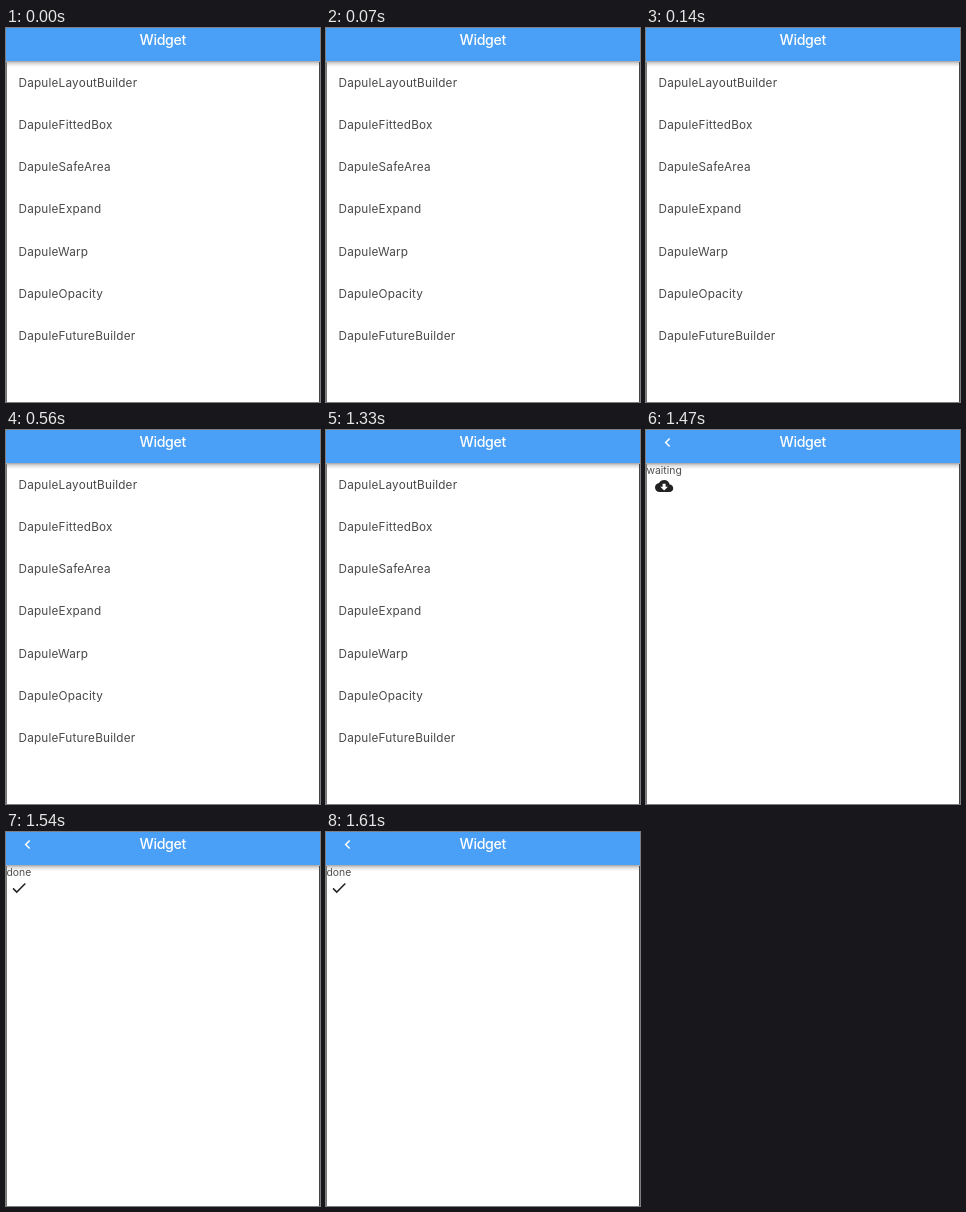
These frames come from a looping animation (314x374 px, 2520 ms). An HTML page:

```html
<!DOCTYPE html>
<html lang="en">
<head>
<meta charset="utf-8">
<title>Widget list</title>
<style>
  html, body { margin: 0; width: 100%; height: 100%; overflow: hidden; background: #fff; }
  svg { display: block; width: 100vw; height: 100vh; font-family: Inter, Roboto, sans-serif; }
  .title { font-size: 14.2px; font-weight: 500; letter-spacing: -.35px; fill: #fff; }
  .item { font-size: 11.75px; letter-spacing: .2px; fill: #484848; }
  .status { font-size: 10.4px; fill: #505050; }
</style>
</head>
<body>
<svg viewBox="0 0 314 374" xmlns="http://www.w3.org/2000/svg">
  <defs>
    <linearGradient id="shade" x2="0" y2="1">
      <stop offset="0" stop-color="#000" stop-opacity=".36"/>
      <stop offset=".4" stop-color="#000" stop-opacity=".14"/>
      <stop offset="1" stop-color="#000" stop-opacity="0"/>
    </linearGradient>
  </defs>
  <rect width="314" height="374" fill="#fff"/>
  <rect y="33" width="314" height="6" fill="url(#shade)"/>
  <rect width="314" height="33" fill="#4a9ff6"/>
  <text class="title" x="156.8" y="17.3" text-anchor="middle">Widget</text>

  <g id="list"></g>

  <g id="detail">
    <path fill="#fff" transform="translate(12.5 3.4) scale(.76)" d="M15.41 7.41 14 6l-6 6 6 6 1.41-1.41L10.83 12z"/>
    <text id="status" class="status" x="0.5" y="43.5"></text>
    <path id="cloud" fill="#222" transform="translate(9 46.9) scale(.76)" d="M19.35 10.04C18.67 6.59 15.64 4 12 4 9.11 4 6.6 5.64 5.35 8.04 2.34 8.36 0 10.91 0 14c0 3.31 2.69 6 6 6h13c2.76 0 5-2.24 5-5 0-2.64-2.05-4.78-4.65-4.96zM17 13l-5 5-5-5h3V9h4v4h3z"/>
    <path id="check" fill="#222" transform="translate(3.9 46.7) scale(.76)" d="M9 16.17 4.83 12l-1.42 1.41L9 19 21 7l-1.41-1.41z"/>
  </g>

  <path d="M.5 34V374" stroke="#777"/>
  <path d="M313.5 34V374" stroke="#444"/>
</svg>
<script>
const LOOP = 2520, OPEN = 1470, DONE = 1540;
const labels = ['LayoutBuilder', 'FittedBox', 'SafeArea', 'Expand', 'Warp', 'Opacity', 'FutureBuilder'];
const $ = id => document.getElementById(id);
const show = (id, on) => $(id).setAttribute('display', on ? 'inline' : 'none');

labels.forEach((label, i) => {
  const row = document.createElementNS('http://www.w3.org/2000/svg', 'text');
  row.setAttribute('class', 'item');
  row.setAttribute('x', 12.5);
  row.setAttribute('y', 58.8 + i * 42.2);
  row.textContent = 'Dapule' + label;
  $('list').append(row);
});

function draw(t) {
  const opened = t >= OPEN, done = t >= DONE;
  show('list', !opened);
  show('detail', opened);
  show('cloud', !done);
  show('check', done);
  $('status').textContent = done ? 'done' : 'waiting';
}

const start = performance.now();
function tick() {
  draw((performance.now() - start) % LOOP);
  requestAnimationFrame(tick);
}
tick();
</script>
</body>
</html>
```
